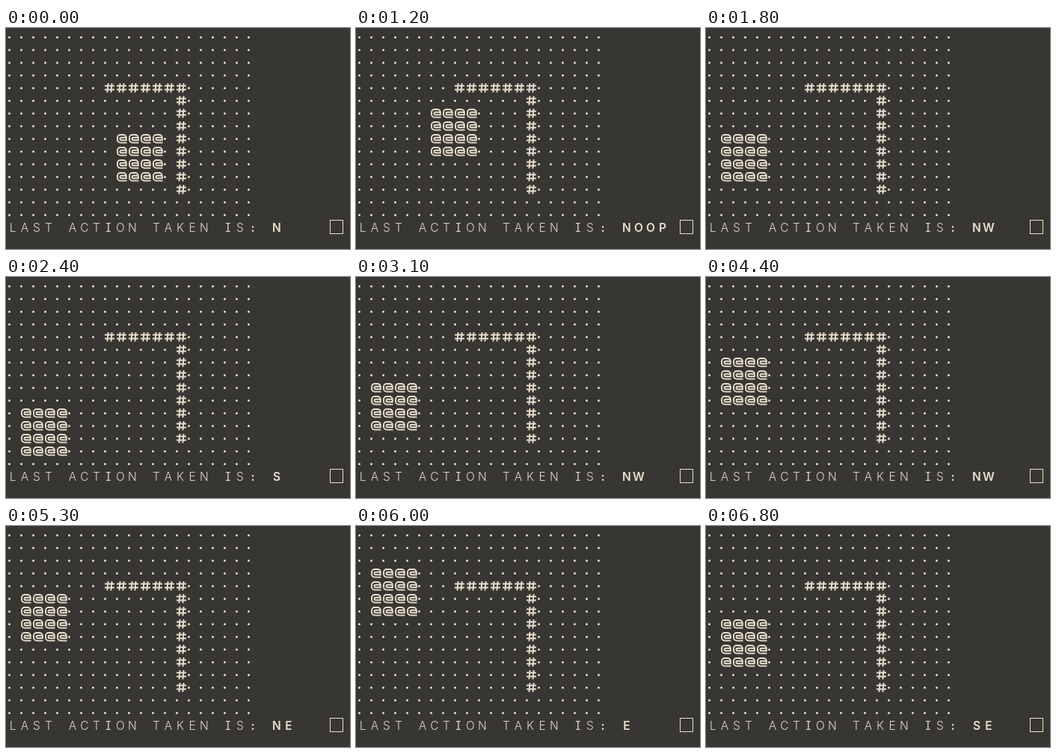
These frames come from a looping animation (460x296 px, 6900 ms). An HTML page with a canvas:

```html
<!DOCTYPE html>
<html lang="en">
<head>
<meta charset="utf-8">
<title>Grid walk</title>
<style>
html, body { margin: 0; width: 100%; height: 100%; overflow: hidden; background: #383632; }
canvas { display: block; width: 460px; height: 296px; }
</style>
</head>
<body>
<canvas id="stage" width="460" height="296"></canvas>
<script>
const ctx = document.getElementById("stage").getContext("2d");
const CELL_W = 16, CELL_H = 17, COLS = 21, ROWS = 15, SIZE = 4;
const STEP = 100, BG = "#383632", INK = "#e9dfcf", THIN = "#dcd5c9";

// One action per step; "-" is a blocked move that changes nothing.
const actions = ("NW N W S NE N - - SW S NW NOOP SW SW N " +
  "SW SW NW W NOOP S E NOOP S - - NW - " +
  "E E NW S SE N W NOOP E S NE W W NE " +
  "N NW W NOOP SE E NW SW N NOOP NE N W S " +
  "NE NW NOOP E S SE W SW E S NW SE").split(" ");

function move(pos, action) {
  if (action === "-") return pos;
  const next = { col: pos.col, row: pos.row, action };
  if (action !== "NOOP") {
    next.col += action.includes("E") - action.includes("W");
    next.row += action.includes("S") - action.includes("N");
  }
  return next;
}

const states = [{ col: 9, row: 8, action: "N" }];
for (const a of actions) states.push(move(states[states.length - 1], a));

const isWall = (c, r) => (r === 4 && c >= 8 && c <= 14) || (c === 14 && r >= 4 && r <= 12);
const isAgent = (s, c, r) => c >= s.col && c < s.col + SIZE && r >= s.row && r < s.row + SIZE;

function dot(x, y) {
  ctx.beginPath();
  ctx.arc(x + 4.5, y + 12.5, 1.5, 0, Math.PI * 2);
  ctx.fill();
}

function hash(x, y) {
  const cx = x + 10.5, cy = y + 12;
  ctx.lineWidth = 1.9;
  ctx.beginPath();
  for (const d of [-2.5, 2.5]) {
    ctx.moveTo(cx - 6.5, cy + d);
    ctx.lineTo(cx + 6.5, cy + d);
    ctx.moveTo(cx + d + 0.6, cy - 6);
    ctx.lineTo(cx + d - 0.6, cy + 6.3);
  }
  ctx.stroke();
}

function at(x, y) {
  const cx = x + 11, cy = y + 12.3;
  ctx.lineWidth = 1.9;
  ctx.beginPath();
  ctx.moveTo(cx + 6.5, cy + 5.3);
  ctx.arcTo(cx - 6, cy + 5.3, cx - 6, cy, 4);
  ctx.arcTo(cx - 6, cy - 5.3, cx, cy - 5.3, 4);
  ctx.arcTo(cx + 5.8, cy - 5.3, cx + 5.8, cy, 4);
  ctx.lineTo(cx + 5.8, cy + 2);
  ctx.lineTo(cx, cy + 2);
  ctx.arcTo(cx - 2.5, cy + 2, cx - 2.5, cy, 1.8);
  ctx.arcTo(cx - 2.5, cy - 1.6, cx, cy - 1.6, 1.8);
  ctx.lineTo(cx + 5.8, cy - 1.6);
  ctx.stroke();
}

function write(text, col, weight, offset) {
  [...text].forEach((ch, i) => {
    const family = ch === "I" ? '"Noto Sans Mono", monospace' : 'Inter, "DejaVu Sans", sans-serif';
    ctx.font = `${weight} 15.5px ${family}`;
    ctx.fillText(ch, (col + i) * CELL_W + offset, 272.5);
  });
}

function draw(state) {
  ctx.fillStyle = BG;
  ctx.fillRect(0, 0, 460, 296);
  ctx.fillStyle = ctx.strokeStyle = INK;
  for (let r = 0; r < ROWS; r++) {
    for (let c = 0; c < COLS; c++) {
      const tile = isAgent(state, c, r) ? at : isWall(c, r) ? hash : dot;
      tile(c * CELL_W, r * CELL_H);
    }
  }
  ctx.textAlign = "center";
  ctx.textBaseline = "alphabetic";
  ctx.fillStyle = THIN;
  write("LAST ACTION TAKEN IS", 0, 300, 9);
  ctx.fillStyle = INK;
  write(":", 20, 700, 10);
  write(state.action, 22, 600, 10);
  ctx.lineWidth = 1;
  ctx.strokeRect(433.5, 257.5, 17, 18);
}

function tick(now) {
  draw(states[Math.floor(now / STEP) % states.length]);
  requestAnimationFrame(tick);
}
tick(performance.now());
</script>
</body>
</html>
```
